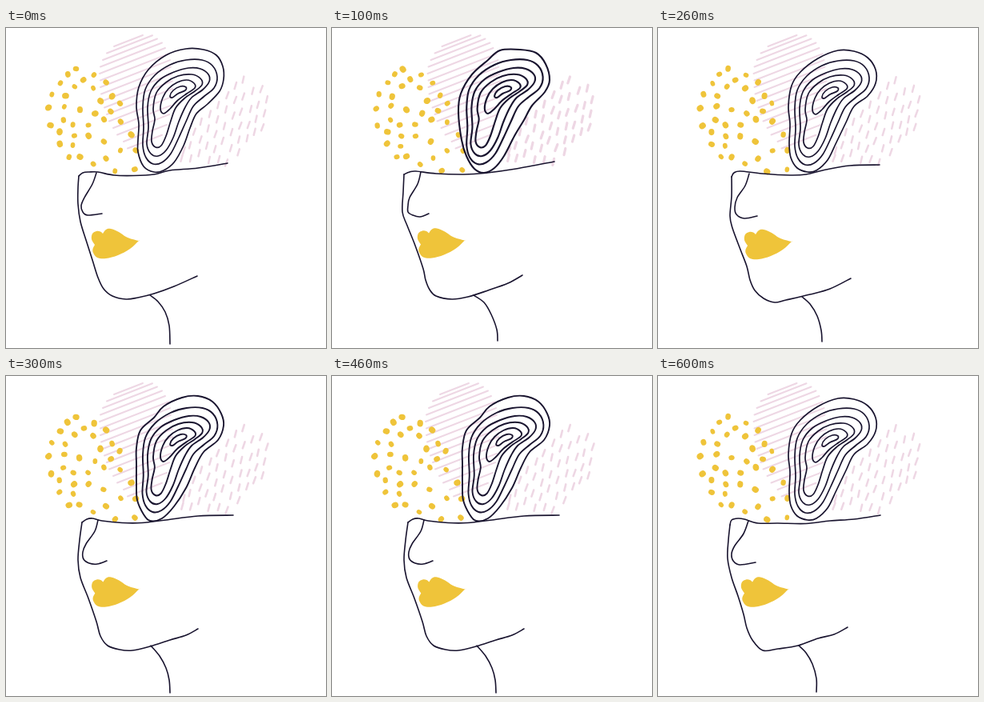
Recreate the animation shown at these times as an HTML page with a canvas. Size 400x400 px, loop 700 ms.

```html
<!DOCTYPE html>
<html lang="en">
<head>
<meta charset="utf-8">
<title>Line portrait</title>
<style>
html, body { margin: 0; width: 100%; height: 100%; overflow: hidden; background: #fff; }
canvas { display: block; width: 400px; height: 400px; }
</style>
</head>
<body>
<canvas id="stage" width="400" height="400"></canvas>
<script>
const ctx = document.getElementById('stage').getContext('2d');
const INK = '#19142f', GOLD = '#efc43a', PINK = '#eed7e4';
const STEP = 100;

// Smooth curve through a flat list of x, y; a doubled point makes a corner.
function curve(list, closed) {
  const n = list.length / 2;
  const at = i => {
    i = closed ? (i + n) % n : Math.max(0, Math.min(n - 1, i));
    return [list[2 * i], list[2 * i + 1]];
  };
  ctx.beginPath();
  ctx.moveTo(...at(0));
  for (let i = 0; i < (closed ? n : n - 1); i++) {
    const [a, b, c, d] = [at(i - 1), at(i), at(i + 1), at(i + 2)];
    ctx.bezierCurveTo(
      b[0] + (c[0] - a[0]) / 6, b[1] + (c[1] - a[1]) / 6,
      c[0] - (d[0] - b[0]) / 6, c[1] - (d[1] - b[1]) / 6, c[0], c[1]);
  }
  if (closed) ctx.closePath();
}

function stroke(list, width, closed) {
  curve(list, closed);
  ctx.lineWidth = width;
  ctx.stroke();
}

function random(seed) {
  return () => {
    seed = (seed * 16807) % 2147483647;
    return seed / 2147483647;
  };
}

const headA = {
  brow: [91,185, 96,181, 104,180, 115,180, 135,184, 160,184.5, 185,183, 205,178, 240,175, 277,169],
  face: [91,185, 90,200, 90,220, 93,242, 100,265, 108,290, 115,312, 122,326, 133,335, 150,339, 165,337, 185,332, 210,323, 239,310],
  nose: [113,181, 108,195, 98,212, 94,222, 96,230, 102,234, 120,232],
  neck: [180,334, 190,342, 199,355, 204,372, 205,395],
  lips: [0, 0]
};
const headB = {
  brow: [90,183, 97,180, 105,179, 130,182, 165,183, 190,181.5, 230,176, 278,167],
  face: [90,183, 89,205, 88,230, 94,247, 104,272, 114,301, 117,315, 122,327, 130,335, 150,339, 170,336, 195,328, 220,319, 238,309],
  nose: [111,180, 107,195, 97,212, 95,222, 95,230, 101,234, 110,236, 121,232],
  neck: [177,334, 190,343, 199,358, 206,377, 207,391],
  lips: [0, -0.5]
};
const headC = {
  brow: [92,186, 95,181, 103,179, 130,182, 165,184, 185,183, 210,177, 240,172, 277,171],
  face: [92,186, 92,210, 90,235, 93,250, 103,277, 111,298, 115,315, 121,328, 132,338, 146,343, 160,340, 190,333, 215,326, 241,313],
  nose: [114,182, 109,197, 99,212, 96,224, 98,233, 108,238, 124,235],
  neck: [180,336, 190,345, 199,360, 204,378, 205,392],
  lips: [1, 1]
};
const headD = {
  brow: [95,183, 101,179, 108,178, 120,181, 145,183.5, 170,183.5, 200,180, 240,175, 284,174],
  face: [95,183, 92,205, 90,230, 93,252, 103,278, 113,307, 118,325, 127,337, 142,342, 158,343, 180,338, 205,330, 225,324, 240,316],
  nose: [115,180, 111,194, 100,210, 96,220, 97,229, 104,234, 114,235, 126,231],
  neck: [181,337, 192,350, 200,365, 204,380, 205,396],
  lips: [0.3, 0.5]
};
const headE = {
  brow: [90,186, 92,180, 100,178, 108,179, 125,184, 150,184, 185,184.5, 215,181, 245,179, 278,174],
  face: [90,186, 88,205, 87,228, 92,252, 100,275, 107,298, 111,315, 118,330, 131,343, 150,341, 175,337, 200,328, 220,323, 237,314],
  nose: [113,181, 107,197, 96,212, 92,222, 94,231, 102,236, 122,233],
  neck: [176,337, 185,346, 193,360, 198,378, 198,395],
  lips: [-3, 0.5]
};
const lips = [107,264, 108,257, 113,254, 118,254.5, 121,257, 121,257, 125,252, 131,251, 141,255, 150,261,
  158,264, 166,266, 166,266, 155,276, 140,284, 125,288, 114,287, 109,281, 108.5,276, 111,271, 111,271];

const rings = [
  [171,100, 174,78, 186,60, 205,47, 225,41, 245,41, 258,48, 264,62, 260,76, 247,87, 234,99, 225,118,
    216,138, 206,158, 195,169, 184,171, 175,163, 171,148, 172,125],
  [177,100, 181,80, 193,65, 210,56, 228,51, 243,52, 253,59, 254,68, 246,78, 232,88, 224,100, 216,118,
    209,138, 200,154, 190,161, 181,158, 176,146, 178,125],
  [184,102, 188,82, 200,69, 215,61, 232,59, 243,64, 245,72, 236,80, 223,89, 212,101, 206,117,
    200,136, 194,148, 187,150, 182,143, 183,130, 186,115],
  [193,102, 196,88, 203,77, 214,69, 226,66, 235,70, 236,76, 226,83, 214,92, 205,102, 197,108],
  [205,86, 209,79, 218,74, 225,75, 224,79, 215,83, 208,88]
];

// Each crown: outer contour, matrix for the inner rings, line width, dot and dash looks.
const crownA = {
  outer: [163,98, 166,74, 178,52, 200,34, 225,26, 247,27, 263,34, 271,48, 272,64, 267,79, 252,95, 238,107,
    230,125, 222,147, 210,168, 197,178, 185,180, 172,173, 165,155, 165,140, 166,120],
  inner: [1, 0, 0, 1, 0, -1], line: 1.7, seed: 11, jitter: 1, dash: 2.5, shift: 0
};
const crownB = {
  outer: [158,105, 161,82, 175,58, 195,40, 210,28, 235,27, 255,31, 267,45, 272,65, 266,80, 250,97, 240,115,
    228,135, 215,160, 203,175, 190,181, 178,176, 168,160, 162,140],
  inner: [1.025, 0, 0, 1, -7, -1], line: 2.1, seed: 29, jitter: 1.8, dash: 3.2, shift: 1.5
};
const crownC = {
  outer: [163,98, 167,72, 178,55, 200,38, 225,28, 245,29, 262,37, 272,52, 272,69, 262,85, 245,98, 235,118,
    222,145, 212,165, 198,178, 187,180, 174,175, 166,162, 164,145, 165,120],
  inner: [1, 0, 0, 1, 0, 0], line: 1.7, seed: 47, jitter: 0.8, dash: 2.5, shift: 0
};
const crownD = {
  outer: [163,90, 168,68, 185,52, 197,38, 220,27, 240,25, 258,32, 269,47, 272,62, 265,80, 247,95, 236,115,
    225,140, 210,163, 195,178, 180,181, 172,173, 164,155, 163,135, 163,110],
  inner: [1, 0, -0.01, 1, 1, -1], line: 1.9, seed: 83, jitter: 0.9, dash: 2.6, shift: 0
};

const dots = [88,51, 77,58, 68,69, 97,65, 110,59, 125,68, 86,73, 109,75, 57,83, 74,85, 118,91, 133,85, 142,94,
  53,100, 73,98, 92,102, 111,107, 131,104, 56,122, 72,115, 84,121, 103,121, 122,114, 143,117, 67,130,
  85,135, 103,135, 122,142, 157,133, 67,145, 84,147, 79,161, 92,161, 109,170, 125,163, 143,153,
  162,153, 136,179, 161,177];
const dashes = [297,65, 287,72, 319,76, 308,79, 277,84, 326,89, 297,86, 286,90, 315,96, 306,101, 275,102,
  265,96, 294,105, 284,109, 323,107, 313,114, 255,107, 264,114, 303,121, 293,122, 273,123, 321,124,
  244,117, 253,126, 282,130, 262,133, 311,130, 302,138, 235,130, 291,139, 243,139, 271,141, 251,147,
  281,150, 261,151, 291,155, 230,146, 241,156, 222,153, 231,163, 254,165, 266,164, 276,168, 220,163];
const stripeLeft = [135,126,121,118,117,118,118,119,121,123,126,129,134,139,147,152];
const stripeRight = [171,183,189,195,199,203,205,206,207,208,208,207,206,204,201,195];

function drawStripes(crown) {
  ctx.strokeStyle = PINK;
  ctx.lineWidth = 2;
  ctx.beginPath();
  const dx = crown === crownA || crown === crownD ? 0 : 2.5;
  stripeLeft.forEach((x, i) => {
    const y = 23 + i * 8.5, end = stripeRight[i];
    ctx.moveTo(x + dx, y);
    ctx.lineTo(end + dx, y - (end - x) * 0.39);
  });
  ctx.stroke();
}

function drawDashes(crown) {
  const rnd = random(crown.seed + 5);
  ctx.strokeStyle = PINK;
  ctx.lineWidth = crown.dash;
  ctx.beginPath();
  for (let i = 0; i < dashes.length; i += 2) {
    const x = dashes[i] + (rnd() - 0.5) * crown.jitter;
    const y = dashes[i + 1] + (rnd() - 0.5) * crown.jitter;
    const lean = 0.8 + rnd() * 0.8;
    ctx.moveTo(x - lean, y + 4);
    ctx.lineTo(x + lean, y - 4);
  }
  ctx.stroke();
}

function drawDots(crown) {
  const rnd = random(crown.seed);
  ctx.fillStyle = GOLD;
  for (let i = 0; i < dots.length; i += 2) {
    const x = dots[i] + crown.shift + (rnd() - 0.5) * crown.jitter;
    const y = dots[i + 1] + (rnd() - 0.5) * crown.jitter;
    const r = 3 + rnd() * 1.1;
    ctx.beginPath();
    ctx.ellipse(x, y, r + 0.4, r - 0.2, rnd() * 3, 0, Math.PI * 2);
    ctx.fill();
  }
}

function drawCrown(crown) {
  drawStripes(crown);
  drawDashes(crown);
  drawDots(crown);
  ctx.strokeStyle = INK;
  stroke(crown.outer, crown.line, true);
  ctx.save();
  ctx.transform(...crown.inner);
  rings.forEach(ring => stroke(ring, crown.line, true));
  ctx.restore();
}

function drawHead(head) {
  ctx.strokeStyle = INK;
  for (const part of ['brow', 'face', 'nose', 'neck']) stroke(head[part], 1.6);
  ctx.save();
  ctx.translate(...head.lips);
  ctx.fillStyle = GOLD;
  curve(lips, true);
  ctx.fill();
  ctx.restore();
}

const poses = [
  [crownA, headA], [crownB, headB], [crownC, headC], [crownD, headD],
  [crownD, headD], [crownC, headB], [crownC, headE]
];
ctx.lineCap = ctx.lineJoin = 'round';

const start = performance.now();
function draw(now) {
  const time = Math.max(0, now - start) % (poses.length * STEP);
  const [crown, head] = poses[Math.floor(time / STEP)];
  ctx.fillStyle = '#fff';
  ctx.fillRect(0, 0, 400, 400);
  drawCrown(crown);
  drawHead(head);
  requestAnimationFrame(draw);
}
draw(start);
</script>
</body>
</html>
```
